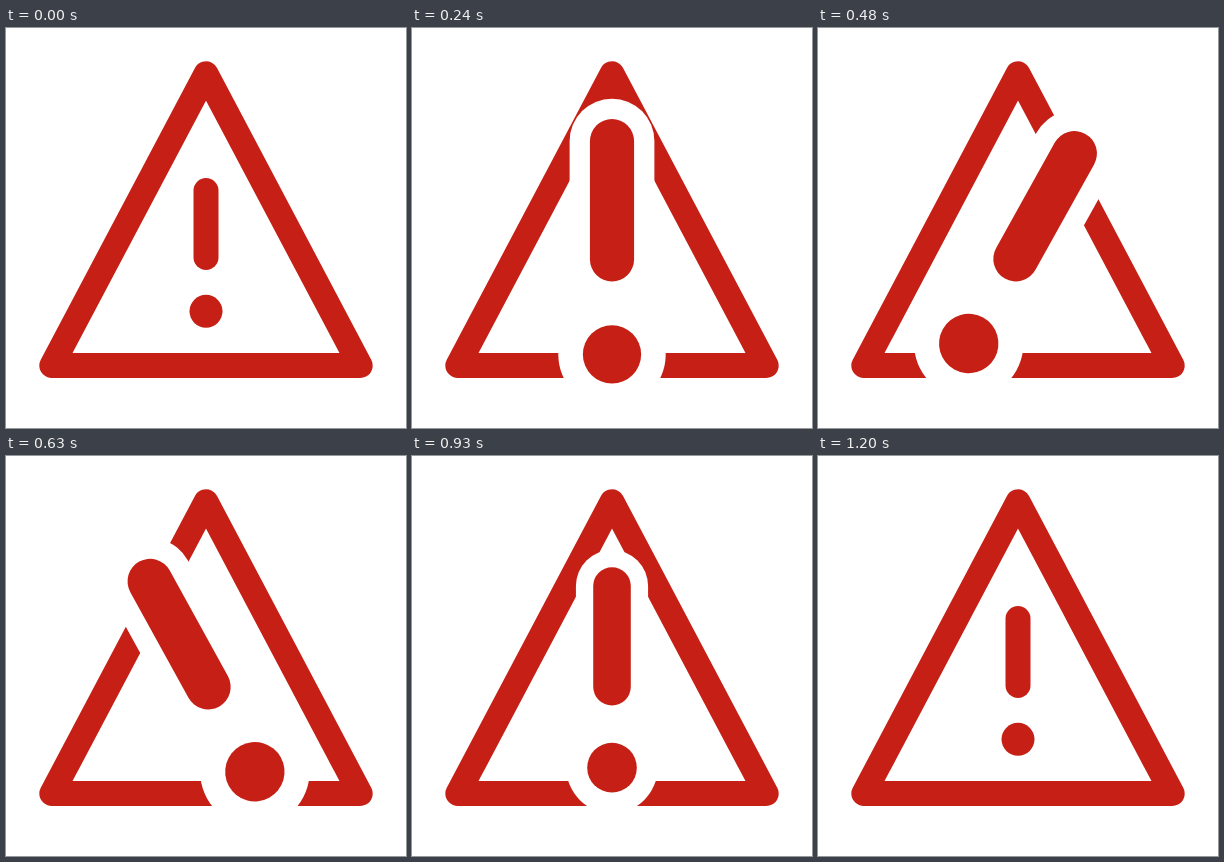
An HTML page for the animation above (3230 ms loop, 400x400 px).

```html
<!DOCTYPE html>
<html lang="en">
<head>
<meta charset="utf-8">
<title>Warning sign</title>
<style>
  html, body { margin: 0; width: 100%; height: 100%; overflow: hidden; background: #fff; }
  svg { display: block; width: 100vw; height: 100vh; }
  .line { fill: none; stroke: #c62016; stroke-width: 25; stroke-linecap: round; stroke-linejoin: round; }
  .dot { fill: #c62016; }
  .gap { fill: #fff; stroke: #fff; stroke-width: 48; stroke-linecap: round; }
</style>
</head>
<body>
<svg viewBox="0 0 400 400">
  <path class="line" d="M200 45.8 L354.2 337.5 H45.8 Z"/>
  <g id="mark" transform="translate(200 227)">
    <path class="gap" d="M0 -64.5 V2.5"/>
    <circle cy="56.3" r="30.4" fill="#fff"/>
    <path class="line" d="M0 -64.5 V2.5"/>
    <circle class="dot" cy="56.3" r="16.5"/>
  </g>
</svg>
<script>
  const LOOP = 3230, STEP = 30, END = 1200;
  // [time in ms, value]
  const SCALE = [[0, 1], [274, 1.8], [740, 1.8], [END, 1]];
  const ANGLE = [[270, 0], [366, -30], [489, 30], [614, -30], [748, 0]];
  const mark = document.getElementById('mark');

  const ease = u => u * u * (3 - 2 * u);

  function valueAt(keys, t) {
    if (t <= keys[0][0]) return keys[0][1];
    for (let i = 1; i < keys.length; i++) {
      const [t0, a] = keys[i - 1], [t1, b] = keys[i];
      if (t < t1) return a + (b - a) * ease((t - t0) / (t1 - t0));
    }
    return keys[keys.length - 1][1];
  }

  function draw() {
    const now = performance.now() % LOOP;
    const t = Math.min(END, Math.floor(now / STEP) * STEP);
    const angle = valueAt(ANGLE, t).toFixed(3);
    const scale = valueAt(SCALE, t).toFixed(4);
    mark.setAttribute('transform', `translate(200 227) rotate(${angle}) scale(${scale})`);
    requestAnimationFrame(draw);
  }
  draw();
</script>
</body>
</html>
```
